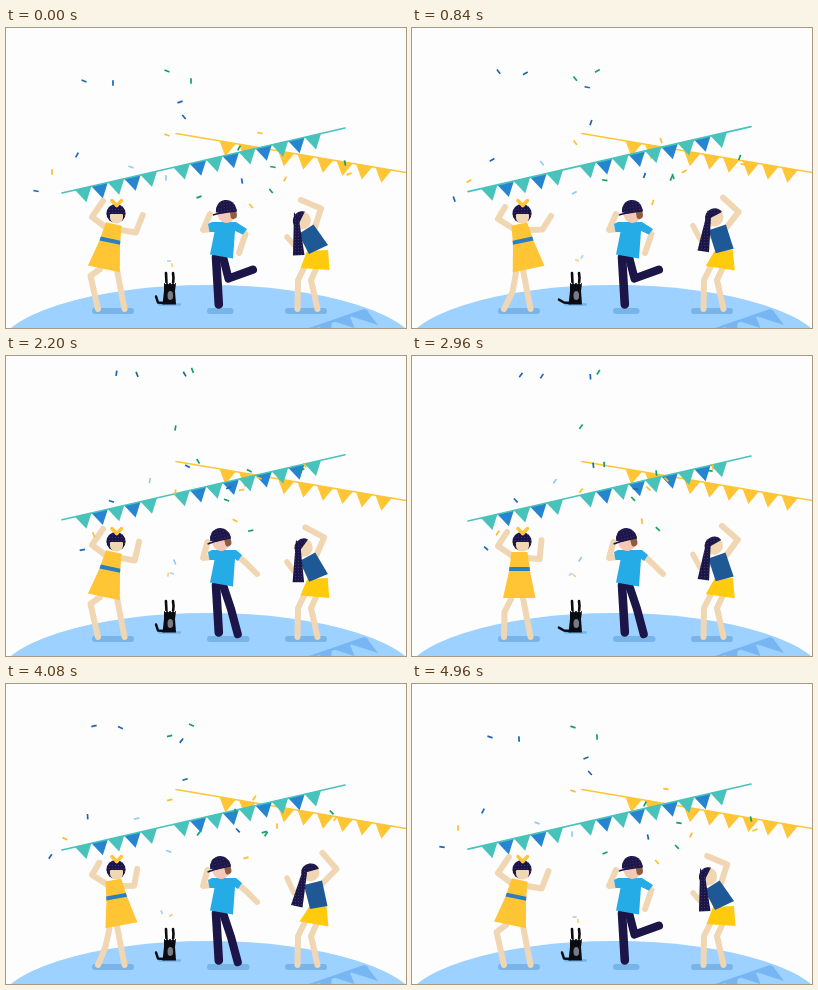
Write an HTML page with a canvas that moves like this. It is 400x300 px and loops after 5000 ms.

```html
<!DOCTYPE html>
<html lang="en">
<head>
<meta charset="utf-8">
<title>Party</title>
<style>
html, body { margin: 0; width: 100%; height: 100%; overflow: hidden; background: #fdfdfd; }
canvas { display: block; width: 400px; height: 300px; }
</style>
</head>
<body>
<canvas id="stage"></canvas>
<script>
const LOOP = 5000;
const TIMES = [0, 840, 1640, 2200, 2960, 4080];
const SKIN = '#f0d6b3', NAVY = '#1b1548', YELLOW = '#ffc535', TEAL = '#47c3bb', BLUE = '#2785cf';

const canvas = document.getElementById('stage');
const ctx = canvas.getContext('2d');
const ratio = window.devicePixelRatio || 1;
canvas.width = 400 * ratio;
canvas.height = 300 * ratio;
ctx.scale(ratio, ratio);

// Smooth periodic curve through one value per key time.
function curve(keys, t) {
  const n = TIMES.length;
  const time = i => TIMES[(i + n) % n] + Math.floor(i / n) * LOOP;
  const val = i => keys[(i + n) % n];
  let i = n - 1;
  while (TIMES[i] > t) i--;
  const slope = j => (val(j + 1) - val(j - 1)) / (time(j + 1) - time(j - 1));
  const d = time(i + 1) - time(i), u = (t - time(i)) / d, v = 1 - u;
  return val(i) * v * v * (1 + 2 * u) + val(i + 1) * u * u * (3 - 2 * u)
    + d * u * v * (slope(i) * v - slope(i + 1) * u);
}

// Cosine wave that peaks at a given time, some cycles per loop.
const wave = (t, peak, cycles = 1) => Math.cos(2 * Math.PI * cycles * (t - peak) / LOOP);
const mix = (a, b, k) => a + (b - a) * k;
const mixPts = (a, b, k) => a.map((p, i) => [mix(p[0], b[i][0], k), mix(p[1], b[i][1], k)]);
const clamp = v => Math.min(1, Math.max(0, v));
const smooth = v => { const u = clamp(v); return u * u * (3 - 2 * u); };
const rad = deg => deg * Math.PI / 180;

function trace(pts) {
  ctx.beginPath();
  pts.forEach(p => ctx.lineTo(p[0], p[1]));
}
function poly(fill, pts) {
  trace(pts);
  ctx.closePath();
  ctx.fillStyle = fill;
  ctx.fill();
}
function limb(color, width, pts) {
  trace(pts);
  ctx.strokeStyle = color;
  ctx.lineWidth = width;
  ctx.lineCap = ctx.lineJoin = 'round';
  ctx.stroke();
}
function oval(fill, x, y, rx, ry = rx, from = 0, to = 360) {
  ctx.beginPath();
  ctx.ellipse(x, y, rx, ry, 0, rad(from), rad(to));
  ctx.fillStyle = fill;
  ctx.fill();
}
function block(fill, x, y, w, h, radii) {
  ctx.beginPath();
  ctx.roundRect(x, y, w, h, radii);
  ctx.fillStyle = fill;
  ctx.fill();
}
function posed(x, y, deg, draw) {
  ctx.save();
  ctx.translate(x, y);
  ctx.rotate(rad(deg));
  draw();
  ctx.restore();
}

function makeDots() {
  const tile = document.createElement('canvas');
  tile.width = tile.height = 3;
  const c = tile.getContext('2d');
  c.fillStyle = NAVY;
  c.fillRect(0, 0, 3, 3);
  c.fillStyle = '#3b366a';
  c.fillRect(1, 1, 1, 1);
  return ctx.createPattern(tile, 'repeat');
}
const DOTS = makeDots();

// A string of flags from x0 to x1; the slot named by gap stays empty.
function bunting(x0, y0, x1, slope, start, step, count, gap, colors) {
  const y = x => y0 + (x - x0) * slope;
  for (let s = 0; s < count; s++) {
    if (s === gap) continue;
    const a = start + s * step, b = a + 16.4, m = (a + b) / 2;
    poly(colors[s % colors.length], [[a, y(a)], [b, y(b)], [m - slope * 14, y(m) + 14]]);
  }
  limb(colors[0], 1.6, [[x0, y0], [x1, y(x1)]]);
}

function scenery(t) {
  ctx.fillStyle = '#fdfdfd';
  ctx.fillRect(0, 0, 400, 300);
  oval('#9dd1ff', 202, 325, 212, 68);
  const shade = '#77b6f2';
  poly(shade, [[303, 300], [358, 281], [362, 283], [310, 300]]);
  for (let i = 0; i < 3; i++) {
    const x = 309 + i * 17.5, y = 298 - i * 5;
    poly(shade, [[x, y], [x + 17, y - 5.5], [x + 16 + i * 6, y + 5 + i * 2]]);
  }
  bunting(170, 105.5, 402, 0.1696, 213.5, 19.5, 9, 2, [YELLOW]);
  bunting(56, 164.6 - 1.4 * wave(t, 1500), 339, -0.2297, 69, 16.4, 15, 5, [TEAL, BLUE]);
}

const shadow = (from, to, y = 283, w = 6) => limb('#78b4e8', w, [[from + w / 2, y], [to - w / 2, y]]);

function cat(t) {
  const swing = clamp(wave(t, 650, 2));
  const bend = clamp(4 * wave(t, 1640) - 3);
  const ink = '#0b0b12';
  shadow(152, 175, 276.5, 2.5);
  limb(ink, 2.4, [[158, 275], [152, 274.5], [150 - 3.5 * swing, 268.5 + 3.5 * swing]]);
  poly(ink, [[158, 255], [170, 255], [169, 263], [170, 276.5], [156.5, 276.5], [158, 263]]);
  limb(ink, 2.6, [[160.5, 256], [160 - bend * 1.5, 245]]);
  limb(ink, 2.6, [[167, 256], [167.5 + bend, 250], [167 - bend, 245]]);
  oval('#767b87', 164.3, 267.5, 2.8, 4.6);
  for (let x = 159.5; x < 170; x += 3) oval('#e4e7ec', x, 255.5, 0.8);
}

function dancer(t) {
  const sway = curve([12, -12, -3.5, 12, 0, -10.5], t);
  const k = sway / 12;
  const reach = wave(t, 800);
  shadow(86, 128);
  limb(SKIN, 6, [[99 - 5 * k, 243 - 2 * k], [92.5 - 8 * k, 256 - 8 * k], [92, 281]]);
  limb(SKIN, 6, [[111, 242], [118.5, 281]]);
  limb(SKIN, 6, [[102, 201], [86, 190 - k], [95 + 2 * k, 176 - 3 * k]]);
  limb(SKIN, 6, [[115, 202], [129 + 1.5 * reach, 203 + 1.5 * k], [134 + 5 * reach, 186 + 2 * reach]]);
  posed(107.5, 197, sway, () => {
    poly(YELLOW, [[-8, -1], [8, -1], [10.5, 18], [16, 45], [-16.5, 45], [-10.5, 18]]);
    poly('#2b7fc0', [[-10, 14], [10, 14], [10.5, 18], [-10.5, 18]]);
  });
  oval(DOTS, 110, 185.5, 9.6);
  block(SKIN, 104, 186, 13, 9.5, [1, 1, 6, 6]);
  for (const side of [-1, 1]) limb(YELLOW, 3.4, [[110.7, 177.5], [110.7 + side * 4.8, 172.5]]);
}

function boy(t) {
  const kick = smooth(3 * wave(t, 360) - 0.4);
  shadow(201, mix(243.5, 227.5, kick));
  limb(NAVY, 8.6, [[210, 229], [212.8, 276.5]]);
  const knee = [mix(225, 222.5, kick), mix(253, 250.5, kick)];
  const bend = rad(mix(75, -20, kick));
  limb(NAVY, 8.2, [[217, 229], knee, [knee[0] + 26 * Math.cos(bend), knee[1] + 26 * Math.sin(bend)]]);
  limb(SKIN, 6, mixPts([[231, 199], [241, 208], [251, 218]], [[234, 201], [239.5, 206], [233, 225]], kick));
  limb(SKIN, 6, [[206, 201], [197, 202], [mix(201.5, 204, kick), 186]]);
  const sleeve = mixPts([[236, 199], [232, 205]], [[241, 201], [237, 206.5]], kick);
  poly('#25abe6', [[206, 194], [230, 194], ...sleeve, [229, 203], [227, 230.5],
    [204, 226.5], [208.5, 204], [203.5, 204], [202, 196]]);
  posed(mix(214, 220, kick), 181, mix(-13, -8, kick), () => {
    oval('#f6c9b6', 0, 5, 9);
    block('#8e5b43', 3.5, 3, 6.5, 8, [0, 1, 5, 3]);
    oval(DOTS, 0, 2, 10.5, 11, 180, 360);
    poly(DOTS, [[-10.5, 1.5], [10.5, 1.5], [10.5, 4], [-5, 4]]);
    limb(NAVY, 1.7, [[-13, 4], [-4, 3]]);
  });
}

function waver(t) {
  const k = curve([0, 0.75, 1, 0.2, 0.7, 1], t);
  const between = (a, b) => mixPts(a, b, k);
  shadow(279, 321);
  limb(SKIN, 6, [[298.5, 239], [292, 252], [291.5, 281]]);
  limb(SKIN, 6, [[311, 239], [305, 252], [311.5, 281]]);
  limb(SKIN, 5.5, between([[281, 209], [288, 217], [298, 212]], [[281, 194], [288, 209], [300, 206]]));
  limb(SKIN, 6, between([[295, 172], [315, 180.5], [308, 202]], [[316.5, 169], [330.5, 185], [314, 202]]));
  poly('#ffcb0c', between([[301, 223], [322, 222], [323.5, 242], [294.5, 240]],
    [[303, 223], [320.5, 222], [322.5, 242.5], [293.5, 237.5]]));
  poly('#1e5996', between([[292.5, 206], [307.5, 196.5], [322, 217], [303, 226]],
    [[298, 201], [316, 196.5], [321.5, 222], [304, 225]]));
  const [head] = between([[296, 192.5]], [[304.5, 188.5]]);
  oval(SKIN, head[0], head[1], 9);
  posed(head[0], head[1], mix(-48, 0, k), () => oval(DOTS, 0, 0, 9.4, 9, 172, 335));
  poly(DOTS, between([[288, 184], [293, 192], [298.5, 227], [287, 227.5]],
    [[298, 182.5], [301, 189], [296.5, 223.5], [285, 221]]));
}

// Each piece: where it starts and how far down it drifts by mid loop.
const CONFETTI = {
  '#92cdf0': [[125, 139, -15], [160, 150, 58]],
  '#fdbd2c': [[161, 107, 30], [46, 144, 36], [343, 146, -38], [245, 178, -14], [279, 151, -30], [254, 105, 30]],
  '#12a263': [[161, 43, 30], [185, 53, -40], [193, 169, -66], [265, 163, -50], [233, 120, 25], [267, 139, 37],
    [339, 135, -22]],
  '#1d66b0': [[78, 53, -37], [107, 55, -38], [174, 74, -58], [178, 89, 22], [71, 127, 19], [30, 163, 32],
    [236, 153, -22]]
};

function chip(color, size, x, y, deg) {
  posed(x, y, deg, () => {
    ctx.fillStyle = color;
    ctx.fillRect(-size / 2, -0.85, size, 1.7);
  });
}

// Pieces tumble at steady speed while drifting out and back, towards the middle.
function confetti(t) {
  const out = (1 - wave(t, 0)) / 2;
  const turn = 180 * t / LOOP;
  for (const [color, pieces] of Object.entries(CONFETTI)) {
    pieces.forEach(([x, y, fall], i) =>
      chip(color, 5.4, x + (190 - x) * 0.3 * out, y + fall * out, 20 + i * 70 + turn * (1 + i % 2)));
  }
  chip('#f9cf7c', 4, 166 - 4 * out, 237 - 19 * out, 80 - 2 * turn);
  chip('#a9d3ee', 4, 163 + 8 * wave(t, 1250), 233 - 16 * out, -2 * turn);
}

function draw(t) {
  scenery(t);
  cat(t);
  dancer(t);
  boy(t);
  waver(t);
  confetti(t);
}

const begin = performance.now();
function tick() {
  draw((performance.now() - begin) % LOOP);
  requestAnimationFrame(tick);
}
tick();
</script>
</body>
</html>
```
